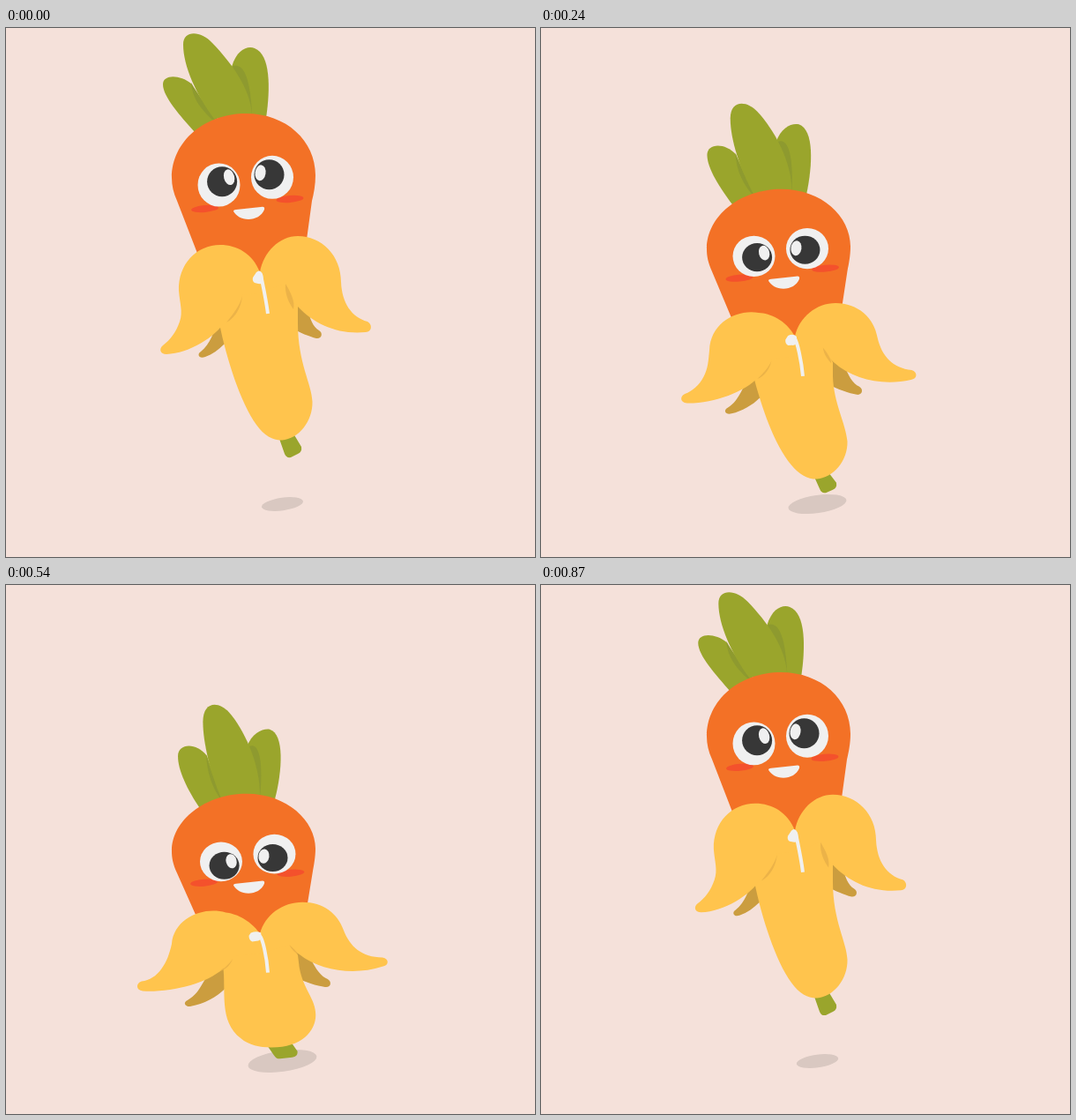
These frames come from a looping animation (600 by 600 pixels, 900 ms). An HTML page with a canvas:

```html
<!DOCTYPE html>
<html lang="en">
<head>
<meta charset="utf-8">
<title>Bouncing carrot</title>
<style>
html, body { margin: 0; height: 100%; overflow: hidden; background: #f5e1da; }
canvas { display: block; width: 100vw; height: 100vh; }
</style>
</head>
<body>
<canvas id="stage" width="600" height="600"></canvas>
<script>
const ctx = document.getElementById('stage').getContext('2d');
const LOOP = 900, STEP = 30;
const GREEN = '#9aa52c', SHADE = '#8e9a2f', ORANGE = '#f37126', YELLOW = '#ffc44d',
      FOLD = '#ecb348', BROWN = '#cb9d3f', WHITE = '#f0f0f0', DARK = '#373737', BLUSH = '#f4512c';

// Each shape: colour, path in the air, path at the ground, optional squashed path.
const leaves = [
  [GREEN, 'M214 118C198 100 178 78 178 64C178 52 198 53 210 63L238 104Z',
          'M220 268C207 248 197 226 197 209C197 195 217 192 230 209L246 258Z'],
  [GREEN, 'M256 44C262 24 274 20 282 23C300 30 300 68 295 102L270 100Z',
          'M275 200C281 184 294 179 301 180C318 185 315 227 306 260L280 260Z'],
  [SHADE, 'M210 62C211 80 222 93 234 104L240 103C226 88 216 74 210 62Z',
          'M229 207C230 230 236 246 244 258L248 258C238 240 232 222 229 207Z'],
  [SHADE, 'M257 43C270 39 277 58 279 97L270 97Z',
          'M277 200C289 192 294 217 289 258L280 258Z'],
  [GREEN, 'M236 103C216 76 201 43 201 19C201 2 221 3 234 17C256 40 277 68 279 98Z',
          'M245 258C234 230 226 195 226 171C226 147 243 146 255 159C270 176 290 217 289 256Z']
];
const head = [ORANGE,
  'M188 170C188 128 226 97 272 97C318 97 351 128 351 167C351 178 349 188 347 196L341 240L288 280L218 258L194 196C190 187 188 179 188 170Z',
  'M188 317C188 283 226 253 273 253C319 253 351 284 351 314C351 324 349 334 348 340L342 376L288 411L215 388L194 342C189 331 188 324 188 317Z'];
const mouth = 'M261 206L289 203Q294 202 293 206C290 213 283 217 275 217C267 217 261 213 258 208Q258 206 261 206Z';
const backPeels = [
  [BROWN, 'M240 330C236 345 232 358 221 367C216 370 219 376 226 373C234 370 241 365 247 359L262 350Z',
          'M240 442C222 454 222 474 204 483C198 486 202 491 208 490C223 487 238 480 250 468L262 452Z'],
  [BROWN, 'M322 310L341 316C345 330 348 339 355 343C360 346 358 353 352 352C344 350 334 346 322 339Z',
          'M322 422L346 436C352 448 358 456 366 459C371 462 370 469 363 468C354 467 340 463 326 456Z']
];
const stem = [GREEN,
  'M309 463L316 483Q318 488 323 487L331 483Q336 481 335 475L326 460Z',
  'M309 543L316 555Q318 561 323 560L331 557Q336 555 335 549L326 540Z',
  'M290 524L299 535Q302 539 306 539L322 538Q329 538 329 532L324 524Z'];
const body = [YELLOW,
  'M268 300L242 335C250 375 266 425 284 450C293 463 304 468 313 467.5C332 466 348 446 347.5 424C347 404 331 380 331 335L331 315L317 290L288 276Z',
  'M258 432L242 451C250 472 262 510 284 533C293 543 304 548 313 547.5C332 546 348 527 347.5 506C345 486 333 464 331 445L331 432L322 420L288 408Z',
  'M256 434L247 443C250 470 236 502 263 521C272 528 285 530 299 530C336 530 352 512 352 494C352 476 338 468 333 445L331 432L322 420L288 408Z'];
const peels = [
  [YELLOW, 'M288 277C280 256 262 246 243 246C216 246 195 268 196 298C197 312 201 322 197 333C193 345 186 354 178 360C173 364 175 370 182 370C208 369 238 350 248 333C259 322 266 312 268 303L300 300Z',
           'M288 409C275 392 258 387 250 386C225 378 190 390 187 420C184 431 180 440 174 447C168 455 160 459 151 460C144 462 144 470 152 471C185 473 226 464 246 447C250 444 254 439 257 435L300 430Z'],
  [YELLOW, 'M288 277C292 254 310 236 331 236C358 236 380 258 380 288C381 312 392 328 410 333C416 336 415 345 408 345C376 348 350 336 331 316C322 305 317 298 317 290L290 300Z',
           'M288 409C294 388 314 374 337 374C360 374 376 386 383 403C391 422 405 433 429 433C437 434 437 442 429 443C398 454 358 450 333 431C327 428 324 425 322 422L290 432Z'],
  [FOLD, 'M268 304C265 316 256 326 250 334C256 331 266 322 268 304Z',
         'M256 438C250 445 246 448 242 450C248 449 252 445 256 438Z'],
  [FOLD, 'M317 290C316 302 321 312 326 319C328 310 323 300 317 290Z',
         'M322 422C325 427 329 429 332 431C330 428 326 425 322 422Z']
];
const zipLine = ['M289 280C291 290 295 308 297 324', 'M286 410C291 410 296 437 297 453'];
const zipPull = [WHITE,
  'M284 277Q288 273 291 279L292 286Q291 291 286 290L282 289Q279 287 280 283Z',
  'M277 408Q284 406 289 408L289 413Q288 417 284 417L279 418Q275 416 275 411Z'];

const clamp = x => Math.min(1, Math.max(0, x));
const smooth = x => (x = clamp(x), x * x * (3 - 2 * x));
const numbers = path => path.match(/[\d.]+/g).map(Number);

function blend(air, ground, squashed, fall, squash) {
  const b = numbers(ground), c = numbers(squashed || ground);
  let i = 0;
  return new Path2D(air.replace(/[\d.]+/g, n => {
    const v = +n + (b[i] - n) * fall + (c[i] - b[i]) * squash;
    i++;
    return v.toFixed(2);
  }));
}

function shape([color, air, ground, squashed], fall, squash = 0) {
  ctx.fillStyle = color;
  ctx.fill(blend(air, ground, squashed, fall, squash));
}

function oval(color, x, y, rx, ry, tilt = 0) {
  ctx.fillStyle = color;
  ctx.beginPath();
  ctx.ellipse(x, y, rx, ry, tilt * Math.PI / 180, 0, 7);
  ctx.fill();
}

function face(p, e) {
  const shift = 143 * p + 5 * e;
  oval(BLUSH, 225.5 - p, 205 + shift, 15.5, 4, -5);
  oval(BLUSH, 322 + p, 194 + shift, 15.5, 4, -5);
  ctx.save();
  ctx.translate(0, shift);
  ctx.fillStyle = WHITE;
  ctx.fill(new Path2D(mouth));
  ctx.restore();

  const dx = 2.7 * e, dy = 147 * p + 4.5 * e, squat = 1 - 0.1 * p;
  const eye = (x, y, px, py, hx, hy, tilt) => {
    oval(WHITE, x, y, 24, 24.5 * squat);
    oval(DARK, x + px, y + py, 17, 17 * squat);
    oval(WHITE, x + px + hx, y + py + hy, 6, 9 * squat, tilt);
  };
  eye(241.5 + dx, 178 + dy, 3.6, -3.8 + 9.2 * p, 8, -5, -15);
  eye(302 + dx, 169.3 + dy, -3.5 + 1.7 * p, -3 + 8.3 * p, -10, -2, 8);
}

function draw(t) {
  const p = smooth(1 - Math.abs(t / 450 - 1));
  const rising = t > 450;
  const squash = smooth(rising ? (800 - t) / 350 : (t - 240) / 210);
  const stemSquash = rising ? clamp((770 - t) / 320) : squash;

  ctx.fillStyle = '#f5e1da';
  ctx.fillRect(0, 0, 600, 600);
  const r = 23.7 + 17.4 * p;
  oval('#d9c8c1', 313.5, 540, r, r * 0.305, -8);

  leaves.forEach(s => shape(s, p));
  backPeels.forEach(s => shape(s, p));
  shape(head, p);
  face(p, Math.sqrt(squash));
  shape(stem, p, stemSquash);
  shape(body, p, squash);
  peels.forEach(s => shape(s, p));

  ctx.strokeStyle = WHITE;
  ctx.lineWidth = 4;
  ctx.stroke(blend(...zipLine, null, p, 0));
  shape(zipPull, p);
}

function tick() {
  draw(Math.floor(performance.now() % LOOP / STEP) * STEP);
  requestAnimationFrame(tick);
}
tick();
</script>
</body>
</html>
```
